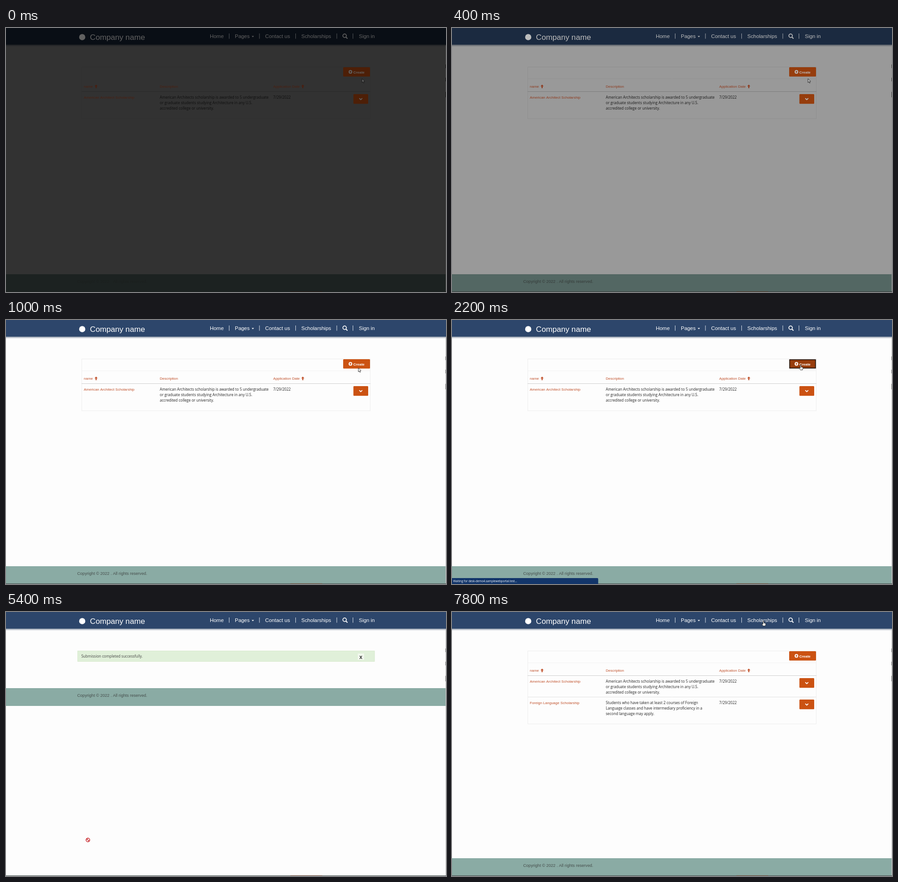
An HTML page with a canvas for the animation above (8000 ms loop, 967 px wide and 579 px high).

```html
<!DOCTYPE html>
<html lang="en">
<head>
<meta charset="utf-8">
<title>Scholarship portal</title>
<style>
  html, body { margin: 0; width: 100%; height: 100%; overflow: hidden; background: #fdfdfd; }
  canvas { display: block; }
</style>
</head>
<body>
<canvas id="stage" width="967" height="579"></canvas>
<script>
const ctx = document.getElementById('stage').getContext('2d');
const W = 967, H = 579, LOOP = 8000, STEP = 200;
const SANS = '"Liberation Sans", Arial, sans-serif';
const HUMAN = '"Open Sans", "Noto Sans", sans-serif';
const NAVY = '#2d466b', ORANGE = '#cb5212', LINK = '#c0502a', SAGE = '#8aaba4', PAGE = '#fdfdfd';
const NAME = 'Foreign Language Scholarship';
const ABOUT = 'Students who have taken at least 2 courses of Foreign Language classes and have ' +
  'intermediary proficiency in a second language may apply.';
const CODE = 'KSHJ2Hb';

const clamp = v => Math.max(0, Math.min(1, v));
const progress = (t, from, to) => clamp((t - from) / (to - from));
const typed = (text, part) => text.slice(0, Math.round(text.length * part));

function rect(x, y, w, h, color) {
  ctx.fillStyle = color;
  ctx.fillRect(x, y, w, h);
}
function frame(x, y, w, h, color, width = 1) {
  ctx.strokeStyle = color;
  ctx.lineWidth = width;
  ctx.strokeRect(x, y, w, h);
}
function text(str, x, y, size, color, family = SANS, weight = 'normal') {
  ctx.font = `${weight} ${size}px ${family}`;
  ctx.fillStyle = color;
  ctx.fillText(str, x, y);
}
const body = (str, x, y, color = '#222') => text(str, x, y, 8.12, color, HUMAN);
const label = (str, x, y) => text(str, x, y, 8.1, '#111', HUMAN, 'bold');
const link = (str, x, y) => text(str, x, y, 8, LINK);

function line(points, color, width = 1) {
  ctx.beginPath();
  points.forEach(([x, y]) => ctx.lineTo(x, y));
  ctx.strokeStyle = color;
  ctx.lineWidth = width;
  ctx.stroke();
}
function shape(points, fill, stroke) {
  ctx.beginPath();
  points.forEach(([x, y]) => ctx.lineTo(x, y));
  ctx.closePath();
  ctx.fillStyle = fill;
  ctx.fill();
  if (stroke) {
    ctx.strokeStyle = stroke;
    ctx.lineWidth = 0.9;
    ctx.stroke();
  }
}
function disc(x, y, r, color) {
  ctx.beginPath();
  ctx.arc(x, y, r, 0, 7);
  ctx.fillStyle = color;
  ctx.fill();
}
function ring(x, y, r, color, width) {
  ctx.beginPath();
  ctx.arc(x, y, r, 0, 7);
  ctx.strokeStyle = color;
  ctx.lineWidth = width;
  ctx.stroke();
}
function roundRect(x, y, w, h, color) {
  ctx.beginPath();
  ctx.roundRect(x, y, w, h, 1.5);
  ctx.fillStyle = color;
  ctx.fill();
}
function dim(light) {
  if (light < 1) rect(0, 0, W, H, `rgba(0,0,0,${1 - light})`);
}

function backdrop(footerTop, footerHeight) {
  rect(0, 0, W, H, PAGE);
  rect(0, footerTop, W, footerHeight, SAGE);
  const shadow = ctx.createLinearGradient(0, 36, 0, 41);
  shadow.addColorStop(0, 'rgba(40,60,90,.55)');
  shadow.addColorStop(1, 'rgba(40,60,90,0)');
  rect(0, 36, W, 5, shadow);
  rect(0, 0, W, 36.5, NAVY);
}

function navigation(dx = 0) {
  ctx.save();
  ctx.translate(dx, 0);
  disc(167.5, 20, 6.8, '#fff');
  text('Company name', 184.5, 26.3, 17.15, '#fff');
  [['Home', 448], ['Pages', 503], ['Contact us', 569.5], ['Scholarships', 649], ['Sign in', 775.5]]
    .forEach(([item, x]) => text(item, x, 21.8, 11.45, '#fff'));
  [490.5, 557, 636.5, 727, 762.5].forEach(x => line([[x, 12], [x, 23.5]], '#dfe4ec'));
  shape([[540, 17.6], [545, 17.6], [542.5, 20.2]], '#fff');
  ring(744.2, 17, 3.9, '#fff', 1.7);
  line([[747, 20], [750.5, 23.3]], '#fff', 2);
  ctx.restore();
}

const footerText = y => text('Copyright © 2022 . All rights reserved.', 156.5, y, 9.11, '#474f4d');

function edges() {
  rect(966, 38, 1, 540, '#c9c9c9');
  [[80, 8], [109, 8], [140, 12]].forEach(([y, h]) => rect(966, y, 1, h, '#555'));
  rect(0, 577.8, W, 1.2, '#4c5654');
  rect(625, 577.8, 70, 1.2, '#6b4c3c');
}

function sortArrow(x) {
  shape([[x, 124], [x + 3.3, 128], [x + 1.2, 128], [x + 1.2, 132], [x - 1.2, 132], [x - 1.2, 128], [x - 3.3, 128]], LINK);
}

function createButton(state) {
  roundRect(741, 86, 59, 20.5, state ? '#983d0d' : ORANGE);
  if (state === 'focus') {
    frame(742, 87, 57, 18.5, '#17100c', 1.7);
    frame(741, 86, 59, 20.5, '#d5d0cd', 0.6);
  }
  disc(757, 96.3, 4, '#fff');
  line([[754.8, 96.3], [759.2, 96.3]], ORANGE, 1.4);
  line([[757, 94.1], [757, 98.5]], ORANGE, 1.4);
  text('Create', 763.3, 99.7, 7.95, '#fff', SANS, 'bold');
}

function row(y, title, lines) {
  link(title, 171, y + 14.6);
  lines.forEach((str, i) => body(str, 338, y + 14.6 + i * 12.4));
  body('7/29/2022', 587.3, y + 14.6);
  roundRect(763.5, y + 5, 32.5, 21.3, ORANGE);
  line([[776.4, y + 14.2], [779.7, y + 17.2], [783, y + 14.2]], '#fff', 1.8);
}

function listPage(light, buttonState, both) {
  backdrop(540, 38);
  frame(166.5, 85.5, 634, both ? 160 : 113.5, '#ededed');
  line([[167, 111.5], [800, 111.5]], '#f3f3f3');
  line([[166, 139.5], [801, 139.5]], '#cfcfcf');
  dim(light ** 0.4);
  navigation();
  footerText(559);
  createButton(buttonState);
  link('name', 171, 131.4);
  sortArrow(198);
  link('Description', 338, 131.4);
  link('Application Date', 587.3, 131.4);
  sortArrow(652.3);
  row(140, 'American Architect Scholarship', [
    'American Architects scholarship is awarded to 5 undergraduate',
    'or graduate students studying Architecture in any U.S.',
    'accredited college or university.']);
  if (both) {
    line([[167, 186.5], [800, 186.5]], '#e2e2e2');
    row(187, NAME, [
      'Students who have taken at least 2 courses of Foreign',
      'Language classes and have intermediary proficiency in a',
      'second language may apply.']);
  }
  edges();
}

function captcha() {
  let seed = 11;
  const random = () => (seed = seed * 16807 % 2147483647) / 2147483647;
  ctx.letterSpacing = '2.3px';
  text(CODE, 156, 416, 20, '#8a8a8a', '"Liberation Mono", monospace', 'bold');
  ctx.letterSpacing = '0px';
  for (let i = 0; i < 150; i++) {
    const size = 0.7 + random();
    rect(153 + random() * 102, 398 + random() * 28, size, size, '#9c9c9c');
  }
  line([[153, 420], [185, 412], [252, 404]], '#999', 1);
  line([[154, 399], [205, 409], [254, 407]], '#aaa', 0.8);
}

function scrollbar() {
  rect(957, 0, 10, H, '#f1f1f1');
  rect(958.5, 10, 8, 529, '#c1c1c1');
  shape([[959.5, 6.5], [964.5, 6.5], [962, 3.5]], '#777');
  shape([[959.5, 572.5], [964.5, 572.5], [962, 575.5]], '#555');
}

function formPage(t) {
  backdrop(573, 5);
  navigation(-5);
  line([[153.5, 82], [153.5, 398]], '#f6f6f6');
  line([[805.5, 82], [805.5, 528]], '#f2f2f2');
  label('Scholarship', 169, 95);
  label('Application Date', 495, 95);
  label('Description', 169, 142);
  frame(169.5, 100.5, 293.5, 20.5, '#b9b9b9');
  rect(761, 100, 27.5, 21, '#eee');
  frame(761, 100.5, 27.5, 20.5, '#ccc');
  frame(495.5, 100.5, 265.5, 20.5, '#b9b9b9');
  rect(771, 107, 8, 8, '#444');
  [109.8, 112.2].forEach(y => line([[771.5, y], [778.5, y]], '#ddd', 0.6));
  [773, 775, 777].forEach(x => line([[x, 109.5], [x, 114.5]], '#ddd', 0.6));
  frame(169.5, 147.5, 619, 204.5, '#dedede');
  line([[783, 350.5], [787, 346.5]], '#777', 0.9);
  line([[785.5, 350.5], [787, 349]], '#777', 0.9);

  body(typed(NAME, progress(t, 2400, 2800)), 176.3, 113.8);
  if (t >= 3000) body('7/29/2022', 502, 113.8);
  body(typed(ABOUT, progress(t, 2800, 3200)), 176.3, 160.8);

  captcha();
  link('Generate a new image', 153, 435);
  link('Play the audio code', 153, 446.5);
  const entry = t >= 3600;
  frame(153.7, 450, 143, 18.7, entry ? '#222' : '#999', entry ? 2 : 1);
  if (entry) {
    text(CODE, 155, 463.2, 11.6, '#555');
    if (t < 4000) line([[206, 453], [206, 466]], '#333', 0.8);
  }
  text('Enter the code from the image', 297, 463.2, 11.47, '#444', SANS, 'bold');
  line([[153, 482.5], [805, 482.5]], '#ececec');
  roundRect(153, 493, 51.2, 20.3, t >= 4000 ? '#983d0d' : ORANGE);
  text('Submit', 165, 506.3, 8, '#fff', SANS, 'bold');
  edges();
  scrollbar();
}

function successPage() {
  backdrop(167, 39);
  navigation();
  roundRect(157.5, 85.3, 652.5, 23.2, '#e0f0d9');
  frame(157.5, 85.3, 652.5, 23.2, '#d3e7c6', 0.8);
  body('Submission completed successfully.', 165.4, 99.8, '#444');
  rect(773, 91, 14, 14, '#f1f8ed');
  text('x', 776.6, 102.6, 12, '#333', SANS, 'bold');
  footerText(186);
  edges();
}

function statusBar() {
  ctx.beginPath();
  ctx.roundRect(-2, 566, 323.3, 15, 2);
  ctx.fillStyle = '#12356a';
  ctx.fill();
  text('Waiting for desk-demo4.samplewebportal.test...', 2.5, 575, 6.3, '#fff', HUMAN);
}

const pointers = {
  arrow() {
    shape([[0, 0], [0, 8.6], [2, 6.9], [3.4, 9.8], [4.8, 9.1], [3.5, 6.3], [6, 6.1]], '#fff', '#333');
  },
  hand() {
    shape([[-1, 0], [0.8, 0], [1, 4], [4.4, 4.8], [5, 6], [4.3, 10.5], [-0.8, 10.5], [-3.4, 6.8], [-2.6, 5.8], [-1, 7]],
      '#fff', '#222');
  },
  blocked() {
    ring(0, 0, 4, '#c4161c', 1.5);
    line([[-2.8, -2.8], [2.8, 2.8]], '#c4161c', 1.5);
  }
};

const path = [
  [0, 782.3, 111, 'arrow'], [800, 782.3, 111, 'arrow'], [1200, 766.3, 99, 'hand'],
  [2400, 766.3, 99, 'arrow'], [2600, 300, 115, 'arrow'], [3000, 340, 175, 'arrow'],
  [3400, 230, 463, 'arrow'], [3800, 179.3, 498.5, 'hand'], [5000, 180, 500, 'blocked'],
  [5800, 180, 500, 'arrow'], [6600, 684.5, 20, 'hand'], [LOOP, 684.5, 20, 'hand']
];

function pointer(t) {
  const next = path.findIndex(key => key[0] > t);
  const [t0, x0, y0, kind] = path[next - 1];
  const [t1, x1, y1] = path[next];
  const p = progress(t, t0, t1), eased = p * p * (3 - 2 * p);
  ctx.save();
  ctx.translate(x0 + (x1 - x0) * eased, y0 + (y1 - y0) * eased);
  pointers[kind]();
  ctx.restore();
}

function draw(t) {
  const light = Math.min(1, 0.2 + t / 1000);
  if (t < 2400) listPage(light, t >= 1400 ? 'focus' : t >= 1200 ? 'hover' : '', false);
  else if (t < 5000) formPage(t);
  else if (t < 7000) successPage();
  else listPage(1, '', true);

  const waiting = [[1600, 2400], [4200, 5000], [6600, 7000]];
  if (waiting.some(([from, to]) => t >= from && t < to)) statusBar();
  pointer(t);
  dim(light ** 0.6);
}

function tick() {
  const t = performance.now() % LOOP;
  draw(Math.floor(t / STEP) * STEP);
  requestAnimationFrame(tick);
}
tick();
</script>
</body>
</html>
```
